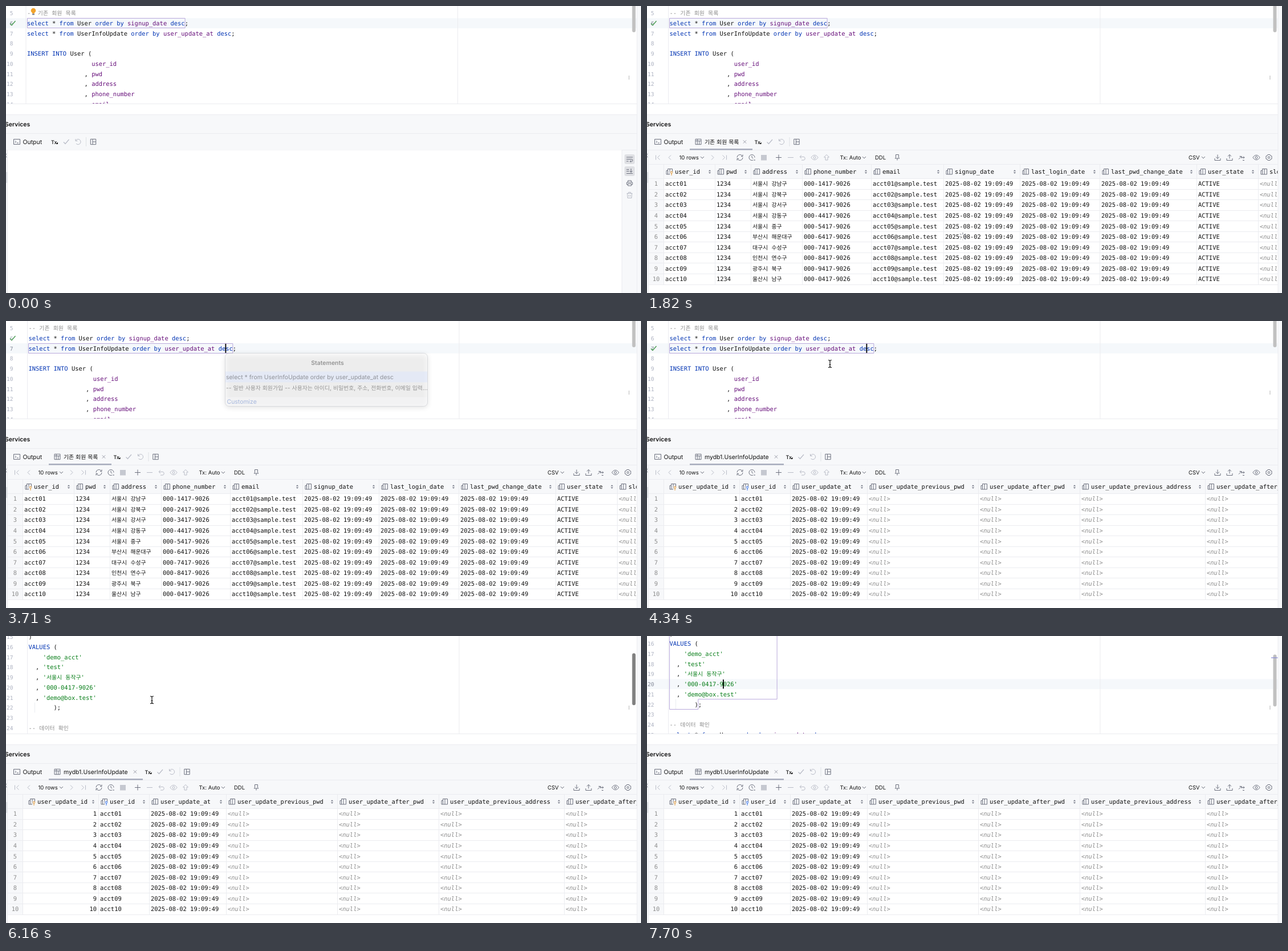
An HTML page with a canvas for the animation above (8000 ms loop, 1114x503 px).

```html
<!DOCTYPE html>
<html lang="ko">
<head>
<meta charset="utf-8">
<title>SQL console</title>
<style>
html, body { margin: 0; width: 100%; height: 100%; overflow: hidden; background: #fff; }
canvas { display: block; }
</style>
</head>
<body>
<canvas id="stage" width="1114" height="503"></canvas>
<script>
const g = document.getElementById('stage').getContext('2d');
const LOOP = 8000, STEP = 70, CHAR = 6.287, LINE = 17.7;
const MONO = '"DejaVu Sans Mono", monospace', UI = 'Inter, sans-serif';
const HANGUL = '"Noto Sans CJK KR", "Noto Sans CJK", sans-serif';
const PANEL = '#f7f8fa', EDGE = '#ebecf0', ICON = '#6c707e', OFF = '#b9bcc7', GREY = '#8c8c8c';

const code = `-- 기존 회원 목록
select * from User order by signup_date desc;
select * from UserInfoUpdate order by user_update_at desc;

INSERT INTO User (
                  user_id
                , pwd
                , address
                , phone_number
                , email
)
VALUES (
    'demo_acct'
  , 'test'
  , '서울시 동작구'
  , '000-0417-9026'
  , 'demo@box.test'
       );

-- 데이터 확인
select * from User order by signup_date desc;`.split('\n');

const signup = '-- 일반 사용자 회원가입 -- 사용자는 아이디, 비밀번호, 주소, 전화번호, 이메일 입력...';
const popups = [
  { from: 1190, to: 1540, line: 6, col: 45, items: ['select * from User order by signup_date desc', signup] },
  { from: 3360, to: 3710, line: 7, col: 55, items: ['select * from UserInfoUpdate order by user_update_at desc', signup] },
  { from: 7210, to: 7630, line: 20, col: 15, items: [
    "INSERT INTO User ( user_id , pwd , address , phone_number , e...", signup, signup] }
];
// first line, last line, width and last width in characters
const statements = { 6: [6, 6, 44, 44], 7: [7, 7, 57, 57], 9: [9, 22, 30, 8] };

const cities = ['서울시 강남구', '서울시 강북구', '서울시 강서구', '서울시 강동구', '서울시 중구',
  '부산시 해운대구', '대구시 수성구', '인천시 연수구', '광주시 북구', '울산시 남구'];
const stamp = '2025-08-02 19:09:49', nil = '<null>';
const acct = i => 'acct' + String(i).padStart(2, '0');
const tables = [null, {
  tab: '기존 회원 목록', tabEnd: 185,
  cols: [['user_id', 29, '#e0932f'], ['pwd', 119], ['address', 182], ['phone_number', 272], ['email', 393],
    ['signup_date', 520], ['last_login_date', 654], ['last_pwd_change_date', 794], ['user_state', 964], ['sleep_date', 1072]],
  row: i => [acct(i), '1234', cities[i - 1], `000-${i % 10}417-9026`, acct(i) + '@sample.test',
    stamp, stamp, stamp, 'ACTIVE', nil]
}, {
  tab: 'mydb1.UserInfoUpdate', tabEnd: 240,
  cols: [['user_update_id', 29, '#e0932f'], ['user_id', 162, '#3574f0'], ['user_update_at', 251],
    ['user_update_previous_pwd', 386], ['user_update_after_pwd', 581],
    ['user_update_previous_address', 759], ['user_update_after_address', 979]],
  row: i => [i, acct(i), stamp, nil, nil, nil, nil]
}];

const icons = {
  term: 'M-5.5-4.5H5.5V4.5H-5.5ZM-3.2-1.8L-1.2 0L-3.2 1.8M0 2H3',
  check: 'M-4.5 .5L-1.5 3.5L5-4',
  undo: 'M-4.5-5V-1.5H-1M-4.3-1.7A4.6 4.6 0 1 1-3.4 3.2',
  back: 'M-2-4L-5-1.2L-2 1.6M-5-1.2H2A3 3 0 0 1 2 4.6H-2',
  layout: 'M-4.7-4.7H4.7V4.7H-4.7ZM-1-4.7V4.7M-1 0H4.7',
  table: 'M-5-4.7H5V4.7H-5ZM-5-1.6H5M-1.7-4.7V4.7M1.7-1.6V4.7',
  close: 'M-2.7-2.7L2.7 2.7M2.7-2.7L-2.7 2.7',
  first: 'M-3.5-4V4M3.5-4L-.5 0L3.5 4', prev: 'M2-4L-2 0L2 4',
  next: 'M-2-4L2 0L-2 4', last: 'M3.5-4V4M-3.5-4L.5 0L-3.5 4',
  down: 'M-3-1.5L0 1.5L3-1.5',
  refresh: 'M-5 0A5 5 0 0 1 4-3M5-5V-2H2M5 0A5 5 0 0 1-4 3M-5 5V2H-2',
  clock: 'M5 0A5 5 0 1 0 2 4.6M0-3V0L2.2 1.5M3 4.5H6',
  plus: 'M-5 0H5M0-5V5', minus: 'M-5 0H5',
  eye: 'M-6 0C-3-5.5 3-5.5 6 0C3 5.5-3 5.5-6 0ZM2 0A2 2 0 1 1-2 0A2 2 0 1 1 2 0',
  up: 'M0-5L4.5-.5H2V4.5H-2V-.5H-4.5Z',
  pin: 'M-2.5-5H2.5V0L4 1.5H-4L-2.5 0ZM0 1.5V5',
  load: 'M0-5V2M-3-1L0 2L3-1M-5 1.5V5H5V1.5',
  save: 'M0 2V-5M-3-2L0-5L3-2M-5 1.5V5H5V1.5',
  swap: 'M-5 3L0-2M-3.5-2H0V1.5M0 0H5M3-2L5 0L3 2M2 5H5',
  gear: 'M-2-5H2L2.8-3.2L5-2.5V2.5L2.8 3.2L2 5H-2L-2.8 3.2L-5 2.5V-2.5L-2.8-3.2ZM1.7 0A1.7 1.7 0 1 1-1.7 0A1.7 1.7 0 1 1 1.7 0',
  wrap: 'M-5.5-3.5H5.5M-5.5 0H3.5A1.9 1.9 0 0 1 3.5 3.8H1M2.5 2L.7 3.8L2.5 5.5M-5.5 3.5H-2',
  end: 'M-5.5-3H-1M-5.5 0H-1M-5.5 4H5.5M2.5-4.5V2M0-.5L2.5 2L5-.5',
  print: 'M-3-1.5V-4.5H3V-1.5M-3 2.5H-5V-1.5H5V2.5H3M-3 1H3V4.5H-3Z',
  trash: 'M-5-3H5M-2-3V-5H2V-3M-4-3L-3.5 5H3.5L4-3M-1.3-.5V2.8M1.3-.5V2.8',
  column: 'M-3-5H5V4.5H-3ZM.5-5V4.5M-3-2H-5.5V4.5H-3'
};
for (const k in icons) icons[k] = new Path2D(icons[k]);

function box(x, y, w, h, color) { g.fillStyle = color; g.fillRect(x, y, w, h); }

function icon(name, x, y, color = ICON, width = 1) {
  g.save();
  g.translate(x, y);
  g.strokeStyle = color;
  g.lineWidth = width;
  g.stroke(icons[name]);
  g.restore();
}

// Draws text around centre height y; Hangul runs get their own font.
function text(s, x, y, color = '#111', family = MONO, size = 10.44, style = '') {
  g.fillStyle = color;
  for (const run of String(s).split(/([가-힣]+)/)) {
    const ko = /[가-힣]/.test(run);
    g.font = `${style} ${ko ? size * .943 : size}px ${ko ? HANGUL : family}`;
    g.fillText(run, x, y + 3.8);
    x += g.measureText(run).width;
  }
}
const label = (s, x, y, size = 10.46, color = '#111', style = '') => text(s, x, y, color, UI, size, style);

// Interpolates rows of [time, ...values].
function track(keys, t) {
  if (t <= keys[0][0]) return keys[0].slice(1);
  const i = keys.findIndex(k => k[0] > t);
  if (i < 0) return keys[keys.length - 1].slice(1);
  const a = keys[i - 1], b = keys[i], f = (t - a[0]) / (b[0] - a[0]);
  return a.slice(1).map((v, n) => v + (b[n + 1] - v) * f);
}
const scrollKeys = [[4620, 0], [4690, 7], [4970, 83], [5110, 110], [5180, 115],
  [5390, 115], [5460, 122], [5600, 160], [5740, 185], [6090, 185], [6160, 188], [6580, 193.7]];
const mousePaths = [
  [[70, 330, 34], [210, 450, 110], [490, 860, 350], [770, 1095, 492]],
  [[2660, 1092, 488], [2730, 820, 320], [2870, 395, 74], [3010, 387, 42], [3360, 387, 42]],
  [[4060, 385, 45], [4340, 321, 75], [4550, 256, 112], [6160, 256, 112], [6650, 134, 84], [7140, 134, 84]]
];

const tokens = /--.*|'[^']*'|\w+|[^\s\w]/g;
function tokenColor(s) {
  if (s.startsWith('--')) return GREY;
  if (s[0] === "'") return '#067d17';
  if (/^(select|from|order|by|desc|INSERT|INTO|VALUES)$/.test(s)) return '#0033b3';
  return /^[a-z_]+$/.test(s) ? '#660e7a' : '#111';
}

function editor(t, mode, scroll) {
  const left = mode ? 39.5 : 37;
  const lineY = n => 12.5 + (n - 5) * LINE - scroll;
  const [row, col] = t < 2870 ? [6, 45] : t < 6720 ? [7, 55] : [20, 15];
  const caretX = left + col * CHAR;

  g.save();
  g.beginPath();
  g.rect(0, 0, 1107, 171);
  g.clip();
  box(0, lineY(row) - 8.8, 1107, LINE, '#f5f8fb');
  box(left - 2.5, 0, 1, 171, EDGE);
  box(left + 755, 0, 1, 171, EDGE);
  box(left + 10.5, lineY(22) - 8.8, 1, LINE, EDGE);

  const [top, bottom, wide, lastWide] = statements[t < 3360 ? 6 : t < 7140 ? 7 : 9];
  const y1 = Math.round(lineY(top) - 8.8) + .5, y3 = Math.round(lineY(bottom) + 8.2) + .5;
  const y2 = top === bottom ? y3 : y3 - LINE;
  const x1 = Math.floor(left) + .5, x2 = x1 + wide * CHAR, x3 = x1 + lastWide * CHAR;
  g.beginPath();
  [[x1, y1], [x2, y1], [x2, y2], [x3, y2], [x3, y3], [x1, y3]].forEach(p => g.lineTo(...p));
  g.closePath();
  if (popups.some(p => t >= p.from && t < p.to)) {
    g.fillStyle = '#cac6fa';
    g.fill();
  }
  g.strokeStyle = '#b9a9dc';
  g.lineWidth = 1;
  g.stroke();

  code.forEach((s, i) => {
    const n = i + 5, y = lineY(n);
    if (y < -12 || y > 184) return;
    text(n, 12.5 - String(n).length * 5.78, y, n === row ? '#858a99' : '#aeb3c2', MONO, 9.6);
    for (const m of s.matchAll(tokens)) text(m[0], left + m.index * CHAR, y, tokenColor(m[0]));
  });
  if (t < 7140) icon('check', 11.5, lineY(t < 3780 ? 6 : 7), '#4f9e58', 1.5);

  if (t < 70 || (t >= 2450 && t < 2660)) {
    const x = left + 11;
    box(x - 5, 3, 10, 15, '#fff');
    g.beginPath();
    g.arc(x, 8, 4.3, 0, 7);
    g.fillStyle = '#f2a32c';
    g.fill();
    box(x - 2, 11, 4, 2, '#f2a32c');
    box(x - 2, 13.5, 4, 2, ICON);
  }
  if (t >= 2100) box(caretX - .8, lineY(row) - 8, 1.8, 16, '#000');

  box(1092.5, 122, 1, 7, '#b5b5b5');
  g.fillStyle = t >= 4690 && t < 6720 ? '#808080' : '#c1c1c1';
  g.beginPath();
  g.roundRect(1098.5, -45 + .4 * scroll, 6, 91, 3);
  g.fill();
  if (t >= 6720) box(1095, 37.5, 12, 1.3, '#8d8fd6');
  g.restore();
  return { lineY, left };
}

function frameParts(mode) {
  box(0, 171, 1107, 1, EDGE);
  box(0, 190, 1107, 313, PANEL);
  box(0, 190, 1107, 1, EDGE);
  label('Services', -2, 207.5, 10.46, '#111', '600');
  box(0, 223, 1107, 1, EDGE);
  icon('term', 19, 238);
  label('Output', 29.5, 238);

  const tab = tables[mode], dx = tab ? tab.tabEnd - 75.5 : 0;
  if (tab) {
    icon('table', 90, 238);
    label(tab.tab, 101, 238);
    icon('close', tab.tabEnd - 13.5, 238, '#9a9da8');
  }
  label('Tx', 79 + dx, 238, 9, '#111', '500');
  g.beginPath();
  g.moveTo(91 + dx, 238.5); g.lineTo(91 + dx, 242); g.lineTo(87.5 + dx, 242);
  g.fill();
  icon('check', 105.5 + dx, 238, OFF, 1.2);
  icon('undo', 126.5 + dx, 238, OFF);
  box(140 + dx, 230, 1, 16, '#dfe1e5');
  icon('layout', 153 + dx, 238);
  box(0, 252, 1107, 1, EDGE);
  if (tab) box(75, 250, tab.tabEnd - 75, 2.5, '#a8adbd');
}

function outputPane() {
  box(3, 252.5, 1077, 251, '#fff');
  box(1080, 252, 1, 251, EDGE);
  for (const y of [260, 281]) {
    g.fillStyle = '#dfe0e4';
    g.beginPath();
    g.roundRect(1085, y, 18, 17, 3);
    g.fill();
  }
  ['wrap', 'end', 'print', 'trash'].forEach((k, i) => icon(k, 1094, 268.5 + i * 21, i === 3 ? OFF : ICON));
}

function toolbar() {
  const y = 265.5;
  const put = (names, xs, color) => names.split(' ').forEach((k, i) => icon(k, xs[i], y, color));
  put('first prev next last minus back eye up', [19, 40, 115, 136, 252, 273, 294, 315], OFF);
  put('refresh clock plus pin load save swap eye gear', [163, 184, 231, 439, 1001, 1022, 1043, 1069, 1091]);
  put('down down down', [97, 381, 976]);
  box(200, 261, 10, 9.5, '#c5c8d0');
  label('10 rows', 56.5, y, 9.5);
  label('Tx: Auto', 338.5, y, 9.5);
  label('DDL', 400, y, 9.5);
  label('CSV', 950, y, 9.5);
}

function grid(table, mode) {
  const rowH = 18.55, top = 302;
  toolbar();
  g.save();
  g.beginPath();
  g.rect(3, 277, 1104, 226);
  g.clip();
  box(29, top, 1078, 201, '#fff');
  box(3, top + rowH * 10, 26, 30, '#fff');
  box(3, 277, 1104, 1, EDGE);
  for (let i = 0; i <= 10; i++) box(3, Math.round(top + i * rowH), 1104, 1, EDGE);

  table.cols.forEach(([name, x, key], c) => {
    const shift = mode === 2 && c === 0 ? 6 : 0;
    const next = table.cols[c + 1];
    box(x, 278, 1, 210, EDGE);
    icon('column', x + 10.5 + shift, 290.5);
    if (key) {
      box(x + 11 + shift, 290, 6, 7, PANEL);
      g.strokeStyle = key;
      g.beginPath();
      g.arc(x + 14 + shift, 291.5, 1.7, 0, 7);
      g.moveTo(x + 14 + shift, 293);
      g.lineTo(x + 14 + shift, 297);
      g.stroke();
    }
    text(name, x + 20 + shift, 290.5);
    if (!next) return;
    const sx = next[1] - 9;
    g.fillStyle = ICON;
    g.beginPath();
    for (const d of [-1, 1]) {
      g.moveTo(sx - 2.2, 290.5 + d);
      g.lineTo(sx + 2.2, 290.5 + d);
      g.lineTo(sx, 290.5 + d * 3.3);
    }
    g.fill();
  });

  for (let i = 1; i <= 10; i++) {
    const y = 311.5 + (i - 1) * rowH;
    text(i, 16 - String(i).length * CHAR / 2, y, GREY);
    table.row(i).forEach((v, c) => {
      const x = typeof v === 'number' ? 159 - String(v).length * CHAR : table.cols[c][1] + 3;
      text(v, x, y, v === nil ? GREY : '#111', MONO, 10.44, v === nil ? 'italic' : '');
    });
  }
  g.restore();
}

function spinner(t) {
  g.lineWidth = 1.6;
  for (let i = 0; i < 8; i++) {
    const a = (i + t / STEP) * Math.PI / 4;
    g.strokeStyle = `rgba(108,112,126,${.2 + i * .1})`;
    g.beginPath();
    g.moveTo(554 + 3.5 * Math.cos(a), 404 + 3.5 * Math.sin(a));
    g.lineTo(554 + 7 * Math.cos(a), 404 + 7 * Math.sin(a));
    g.stroke();
  }
}

function popup(p, t, { lineY, left }) {
  if (t < p.from || t > p.to) return;
  const x = Math.round(left + p.col * CHAR) - .5, y = Math.round(lineY(p.line) + 8) + .5;
  const w = 355, rows = p.items.length * 19.5, h = 54 + rows;
  g.save();
  g.globalAlpha = t === p.to ? .4 : Math.min(1, .35 + (t - p.from) / 200);
  g.beginPath();
  g.roundRect(x, y, w, h, 7);
  g.shadowColor = 'rgba(0,0,0,.3)';
  g.shadowBlur = 10;
  g.shadowOffsetY = 2;
  g.fillStyle = '#fff';
  g.fill();
  g.shadowColor = 'transparent';
  g.save();
  g.clip();
  box(x, y + 32, w, 19, '#d4e2ff');
  box(x, y + 38 + rows, w, 17, PANEL);
  g.textAlign = 'center';
  label('Statements', x + w / 2 + 2, y + 17, 10.46, '#111', '600');
  g.textAlign = 'left';
  p.items.forEach((s, i) => label(s, x + 1.5, y + 41.5 + i * 19.5));
  label('Customize', x + 3, y + 46 + rows, 10.46, '#315fbd');
  g.restore();
  g.strokeStyle = '#b4b6bd';
  g.lineWidth = 1;
  g.stroke();
  g.restore();
}

function mouse(t) {
  const path = mousePaths.find(k => t >= k[0][0] && t < k[k.length - 1][0]);
  if (!path) return;
  const [x, y] = track(path, t);
  g.save();
  g.translate(x, y);
  if (y < 171) {
    const beam = new Path2D('M-3-6.5Q0-6.5 0-4.5Q0-6.5 3-6.5M0-5V5M-3 6.5Q0 6.5 0 4.5Q0 6.5 3 6.5M-1.5 1.5H1.5');
    g.strokeStyle = '#fff'; g.lineWidth = 2.6; g.stroke(beam);
    g.strokeStyle = '#111'; g.lineWidth = 1.2; g.stroke(beam);
  } else {
    const arrow = new Path2D('M0 0V12L2.8 9.5L4.7 13.7L6.6 12.8L4.8 8.8H8.6Z');
    g.strokeStyle = '#fff'; g.lineWidth = 2; g.stroke(arrow);
    g.fillStyle = '#000'; g.fill(arrow);
  }
  g.restore();
}

function draw(now) {
  const t = Math.floor(now % LOOP / STEP) * STEP;
  const mode = t < 1680 ? 0 : t < 3780 ? 1 : 2;
  g.textRendering = 'geometricPrecision';
  g.lineWidth = 1;
  box(0, 0, 1114, 503, '#fff');
  const view = editor(t, mode, track(scrollKeys, t)[0]);
  frameParts(mode);
  if (mode) grid(tables[mode], mode);
  else outputPane();

  // Cropped neighbour panel on the left, tool stripe on the right
  box(2, 253, 1, 250, EDGE);
  box(0, 291, 2.5, 19, '#dfe1e5');
  g.strokeStyle = ICON;
  g.lineWidth = 1;
  g.beginPath();
  g.arc(3.5, 262, 4, 2.2, 4.1);
  g.stroke();
  box(1107, 0, 7, 503, PANEL);
  box(1106.5, 0, 1, 503, EDGE);

  if ((t >= 1820 && t < 2100) || (t >= 3850 && t < 4060)) spinner(t);
  popups.forEach(p => popup(p, t, view));
  mouse(t);
}

const start = performance.now();
function tick() {
  draw(performance.now() - start);
  requestAnimationFrame(tick);
}
tick();
</script>
</body>
</html>
```
